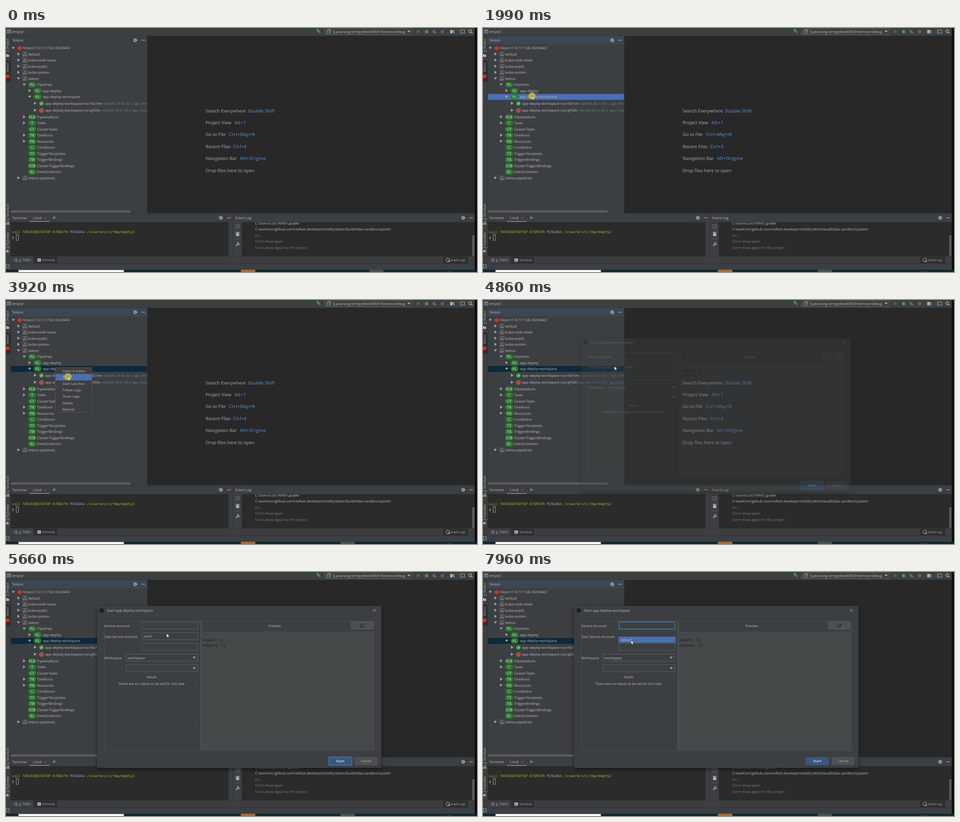
These frames come from a looping animation (1037 px wide and 540 px high, 8000 ms). An HTML page:

```html
<!DOCTYPE html>
<html lang="en">
<head>
<meta charset="utf-8">
<title>Tekton pipeline start</title>
<style>
html, body { margin: 0; width: 100%; height: 100%; overflow: hidden; background: #3c3f41; }
svg { display: block; }
text { font: 7.8px "Open Sans", "Noto Sans", sans-serif; fill: #bbb; text-rendering: geometricPrecision; white-space: pre; }
.dim { fill: #7b7d7f; }
.small { font-size: 6.7px; }
.form { font-size: 7.6px; }
.log { font-size: 7.7px; }
.hint { font-size: 10px; fill: #aeaeae; }
.key { font-size: 10px; fill: #589df6; }
.mono { font: 7.86px "DejaVu Sans Mono", monospace; }
.pill { font-size: 7.6px; fill: #e6efe6; letter-spacing: .4px; }
.mid { text-anchor: middle; }
.bold { font-weight: 700; fill: #c4c8cc; }
.line { fill: none; stroke: #afb1b3; }

/* 1% = 80 ms */
.anim { opacity: 0; animation: 8s step-end -5ms infinite; }
#cursor { animation: move 8s linear -5ms infinite; }
#dialog { transform-origin: 513.5px 254.5px; }

@keyframes move {
  0%, 2.41% { transform: translate(1000px, 561px); animation-timing-function: steps(11); }
  13% { transform: translate(83px, 221px); animation-timing-function: steps(3); }
  16% { transform: translate(74px, 180px); animation-timing-function: steps(6); }
  22.125%, 42% { transform: translate(108px, 150px); animation-timing-function: steps(3); }
  45%, 55.75% { transform: translate(136.5px, 169.5px); animation-timing-function: steps(6); }
  61.875%, 69.8% { transform: translate(365.5px, 135px); animation-timing-function: steps(5); }
  74.6% { transform: translate(306px, 140px); animation-timing-function: steps(6); }
  80.375%, 92.75% { transform: translate(324.5px, 120.5px); animation-timing-function: steps(3); }
  95.75%, 96.69% { transform: translate(328px, 162px); animation-timing-function: steps(3); }
  99.5%, 100% { transform: translate(326px, 151px); }
}
@keyframes press {
  24.875% { opacity: .8; } 30.4% { opacity: 0; }
  46.875% { opacity: .4; } 48% { opacity: .6; } 49% { opacity: .8; } 50.875% { opacity: 0; }
  84.125% { opacity: .5; } 85.125% { opacity: .8; } 86.125% { opacity: 0; }
}
@keyframes tipLow { 16% { opacity: 1; } 18% { opacity: 0; } }
@keyframes tipHigh {
  18% { opacity: 1; } 21.1% { opacity: 0; }
  52% { opacity: 1; } 56.75% { opacity: 0; }
}
@keyframes idle { 0% { opacity: 1; } 24.875%, 100% { opacity: 0; } }
@keyframes active { 24.875%, 100% { opacity: 1; } }
@keyframes row {
  24.125% { opacity: 1; fill: #4b6eaf; }
  28.5% { opacity: 1; fill: #0d293e; }
  50.875% { opacity: 1; fill: #4b6eaf; }
  60.75%, 100% { opacity: 1; fill: #0d293e; }
}
@keyframes menu { 30.4% { opacity: .5; } 31.375% { opacity: 1; } 50.875% { opacity: 0; } }
@keyframes hoverOpen { 43% { opacity: 1; } 45% { opacity: 0; } }
@keyframes hoverStart { 45% { opacity: 1; } 50.875% { opacity: 0; } }
@keyframes dialog {
  60.75% { opacity: .35; transform: scale(.95); }
  61.8% { opacity: .74; transform: scale(.986); }
  62.6% { opacity: .95; transform: scale(.996); }
  63.6%, 100% { opacity: 1; transform: none; }
}
@keyframes ringButton { 0% { opacity: 1; } 82.25%, 100% { opacity: 0; } }
@keyframes ringField { 82.25%, 100% { opacity: 1; } }
@keyframes popup { 93.75%, 100% { opacity: 1; } }
@keyframes hoverItem { 94.75%, 100% { opacity: 1; } }
</style>
</head>
<body>
<svg id="stage" width="1037" height="540" viewBox="0 0 1037 540"></svg>
<script>
const PANEL = '#3c3f41', DARK = '#2b2b2b', EDGE = '#323232', ICON = '#afb1b3', BLUE = '#4b6eaf';

// y is the vertical centre of the text
const text = (x, y, s, cls = '', more = '') =>
  `<text x="${x}" y="${y}" dy=".36em" class="${cls}" ${more}>${s}</text>`;
const rect = (x, y, w, h, fill, more = '') =>
  `<rect x="${x}" y="${y}" width="${w}" height="${h}" fill="${fill}" ${more}/>`;
const path = (d, fill = ICON, more = '') => `<path d="${d}" fill="${fill}" ${more}/>`;
const line = (d, color = ICON, width = 1) => `<path d="${d}" fill="none" stroke="${color}" stroke-width="${width}"/>`;
const dot = (x, y, r, fill) => `<circle cx="${x}" cy="${y}" r="${r}" fill="${fill}"/>`;
const at = (x, y, s) => `<g transform="translate(${x} ${y})">${s}</g>`;
const anim = (name, s, id = '') => `<g class="anim" ${id && `id="${id}"`} style="animation-name:${name}">${s}</g>`;
const clip = (id, s) => `<g clip-path="url(#${id})">${s}</g>`;
const clipBox = (id, x, y, w, h) => `<clipPath id="${id}">${rect(x, y, w, h, '#000')}</clipPath>`;

const gear = (x, y) => at(x, y,
  '<circle r="2.3" class="line" stroke-width="1.7"/><circle r="3.6" class="line" stroke-width="1.5" stroke-dasharray="1.5 1.33"/>');
const dash = (x, y) => rect(x - 4, y - .6, 8, 1.2, ICON);
const cross = (x, y, r, color, w) => line(`M${x - r} ${y - r}l${2 * r} ${2 * r}m0 ${-2 * r}l${-2 * r} ${2 * r}`, color, w);
const arrowRight = (x, y) => at(x, y, path('M-2.4-3.6 3 0-2.4 3.6z', '#a4a6a8'));
const arrowDown = (x, y, r = 3.5) => at(x, y, path(`M${-r} ${-r * .6}H${r}L0 ${r * .75}z`, '#a4a6a8'));

// Tree
const rowY = i => i < 9 ? 44.5 + 13.5 * i : i < 11 ? 167 + 15.5 * (i - 9) : 197 + 13.5 * (i - 11);
const ARROW_X = [16, 27.5, 40, 52, 64], ICON_X = [30, 41.5, 57.5, 69.5, 78], TEXT_X = [37, 49, 68.5, 81, 86];
const tree = [
  [0, 'v', 'host', 'https://172.17.158.182:8443/'],
  [1, '>', 'ns', 'default'], [1, '>', 'ns', 'kube-node-lease'], [1, '>', 'ns', 'kube-public'],
  [1, '>', 'ns', 'kube-system'], [1, 'v', 'ns', 'tekton'],
  [2, 'v', 'PL', 'Pipelines'], [3, '>', 'PL', 'app-deploy'], [3, 'v', 'PL', 'app-deploy-workspace'],
  [4, '>', 'ok', 'app-deploy-workspace-run-hb7vm'], [4, '>', 'bad', 'app-deploy-workspace-run-g569n'],
  [2, '>', 'PLR', 'PipelineRuns'], [2, '>', 'T', 'Tasks'], [2, '', 'CT', 'ClusterTasks'],
  [2, '>', 'TR', 'TaskRuns'], [2, '>', 'PR', 'Resources'], [2, '', 'C', 'Conditions'],
  [2, '', 'TT', 'TriggerTemplates'], [2, '', 'TB', 'TriggerBindings'],
  [2, '', 'CTB', 'ClusterTriggerBindings'], [2, '', 'EL', 'EventListeners'],
  [1, '>', 'ns', 'tekton-pipelines'],
];
const icons = {
  host: () => dot(0, 0, 4.6, '#d9301f'),
  ns: () => rect(-4.5, -4.5, 9, 9, 'none', 'stroke="#7f8284" stroke-width=".8"') +
    rect(-1.1, -2.9, 2.2, 2, ICON) + rect(-3, .9, 2.2, 2, ICON) + rect(.8, .9, 2.2, 2, ICON),
  ok: () => dot(0, 0, 4.9, '#3f9a45') + line('M-2.3 .1-.6 1.9 2.4-1.7', '#d5ead5', 1.1),
  bad: () => dot(0, 0, 4.9, '#c94f4f') + cross(0, 0, 1.9, '#4a2222', 1),
};
const pill = s => rect(-8.6, -5.7, 17.2, 11.4, '#2c7d2f', 'rx="5.7"') + text(.2, 0, s, 'pill mid');
const status = i => i === 9
  ? text(214, rowY(9), 'started 28 m 36 s&#160; ago, finished in 0 s', 'dim')
  : text(211.5, rowY(10), 'started 29 m 35 s&#160; ago, finished in 0 s', 'dim');
const treeRow = ([level, arrow, icon, label], i) => {
  const y = rowY(i);
  return (arrow === 'v' ? arrowDown(ARROW_X[level], y - .5) : arrow ? arrowRight(ARROW_X[level], y - .5) : '') +
    at(ICON_X[level], y, icons[icon] ? icons[icon]() : pill(icon)) + text(TEXT_X[level], y, label);
};
const tip = (i, right) => clip('beyond', rect(310, rowY(i) - 7.7, right - 310, 15.4, PANEL) + status(i));

const toolPanel = () =>
  anim('active', rect(10.5, 18, 300.5, 18, '#3b4754')) +
  text(14, 27, 'Tekton') + gear(284.5, 27) + dash(302.5, 27) +
  rect(10.5, 146, 300, 13, BLUE, 'class="anim" style="animation-name:row"') +
  clip('panel', tree.map(treeRow).join('') + status(9) + status(10)) +
  rect(11, 403.5, 263, 5.5, '#595b5d');

// Frame of the window
const side = (y, s) => text(0, 0, s, 'small', `transform="translate(4 ${y}) rotate(-90)"`);
const toolbar = () =>
  rect(2, 3.5, 9.5, 8.5, '#7c8a94') + rect(3, 6, 7.5, 5, '#4a6a80') + text(14, 8, 'empty1') +
  path('M683 5l4-3.4 2.4 1.2-1.2 1.6 4.6 5.2-1.8 1.8-4.9-5-1.6 1.3z', '#499c54') +
  rect(701.5, .5, 193.5, 14, PANEL, 'rx="2" stroke="#646668"') +
  rect(708.5, 3.5, 6.5, 6, 'none', 'stroke="#afb1b3" stroke-width=".9"') +
  rect(706.5, 6, 6.5, 6, PANEL, 'stroke="#87a9c0" stroke-width=".9"') +
  text(720, 8, '[Ljava.lang.String;@4e4df039 Remote Debug', 'log') + arrowDown(887.5, 7.5) +
  path('M905 4l7 4-7 4z', '#5f6264') +
  '<ellipse cx="926" cy="8.3" rx="2.8" ry="3.8" fill="#499c54"/>' +
  line('M922 4.5l8 7.5m0-7.5l-8 7.5M921.5 8.3h9', '#499c54', .9) +
  path('M939 4h6v4l-3 4-3-3z', '#5f6264') + path('M943 7l5 2.8-5 2.8z', '#6c6f71') +
  rect(957.5, 4.5, 7, 7, '#5f6264') +
  line('M973.5 3v10M994.5 3v10', '#515456') +
  path('M978 4h3.5l1 1.3h4V8H983v4h-5z') + rect(984, 8.5, 4, 3.5, '#4b91c8') +
  rect(1000.5, 4, 9, 7.5, 'none', 'stroke="#afb1b3"') + line('M1002.3 6l1.7 1.6-1.7 1.6', '#59a869') +
  '<circle cx="1022" cy="7" r="3" class="line" stroke-width="1.3"/>' + line('M1024.2 9.3l3 3', ICON, 1.5);

const sidebar = () =>
  rect(0, 72, 10, 47, '#2d2f30') +
  side(53, '<tspan text-decoration="underline">1</tspan>: Project') + path('M0 58h3l1 1h3v5H0z') +
  side(98, 'Tekton') + dot(3.5, 107, 4, '#d9301f') +
  side(425, '<tspan text-decoration="underline">2</tspan>: Structure') +
  rect(0, 432, 3, 3, ICON) + rect(4, 432, 3, 3, ICON) + rect(3, 428, 3, 3, ICON) +
  side(488, '<tspan text-decoration="underline">2</tspan>: Favorites') +
  path('M3.3 489.5l1.2 3h3l-2.4 2 .9 3-2.7-1.8-2.7 1.8.9-3-2.4-2h3z');

const HINTS = [
  ['Search Everywhere', 'Double Shift', 532.5, .15], ['Project View', 'Alt+1', 503, .47],
  ['Go to File', 'Ctrl+Maj+N', 491, .47], ['Recent Files', 'Ctrl+E', 500, .47],
  ['Navigation Bar', 'Alt+Origine', 515, .47], ['Drop files here to open', '', 0, 0],
];
const hints = () => HINTS.map(([label, key, x, gap], i) => {
  const y = 183 + 26.4 * i;
  return text(439.5, y, label, 'hint') + (key && text(x, y, key, 'key', `letter-spacing="${gap}"`));
}).join('');

const terminal = () =>
  rect(10.5, 429.5, 479.5, 75.5, DARK) +
  text(14, 420.5, 'Terminal:', 'form') + text(59.5, 420.5, 'Local') + cross(86.5, 420.5, 2, '#777a7c', .8) +
  rect(52.5, 427, 44, 2.2, '#747a80') + line('M102.5 419.8h7.4m-3.7-3.7v7.4') +
  gear(473, 420) + dash(491, 420) +
  text(13, 451, 'Loic TARVE@DESKTOP-K7QRXTN', 'mono', 'style="fill:#a8a820"') +
  text(140.7, 451, 'MINGW64', 'mono', 'style="fill:#9c8fa0"') +
  text(178.5, 451, '/c/work/src/tmp/empty1', 'mono', 'style="fill:#b5b52a"') +
  text(13, 464.5, '$', 'mono') + rect(22.5, 457, 4.8, 13, 'none', 'stroke="#b0b0b0" stroke-width=".9"');

const eventLog = () =>
  rect(499, 410, 1, 95, EDGE) + rect(519, 429.5, 513, 75.5, DARK) +
  text(505, 420.5, 'Event Log') + gear(1006.5, 420) + dash(1024, 420) +
  rect(506, 435.5, 7.5, 7.5, 'none', 'stroke="#6a6d6f"') + line('M508 439l2 2 4.5-5', '#6a6d6f') +
  path('M506.5 454h7v6.5h-7zM505.5 452h9v1.2h-9zM508.5 451h3v1h-3z') +
  line('M502 466.5h16', '#515456') + line('M506.5 482.5l4.5-4.5', ICON, 1.8) +
  '<circle cx="512" cy="477" r="2.2" class="line" stroke-width="1.5" stroke-dasharray="10.4 3.4"/>' +
  clip('log',
    text(548.5, 432.3, 'C:\\Users\\LoicTARVE\\.gradle', 'log') +
    text(548.5, 445.6, 'C:\\work\\src\\github.com\\redhat-developer\\intellij-tekton\\build\\idea-sandbox\\system', 'log') +
    ['Fix...', "Don't show again", "Don't show again for this project"]
      .map((s, i) => text(548.5, 459 + 13.4 * i, s, 'log dim')).join('')) +
  rect(1026.5, 458.5, 5, 46, '#595b5d');

const bottom = () =>
  rect(61, 506, 52, 15, '#2d2f30') + rect(962, 506, 56, 15, '#2d2f30') +
  line('M18 511.5h1.5m1 0h4.5M18 514h1.5m1 0h4.5M18 516.5h1.5m1 0h4.5') +
  text(28.5, 514, '<tspan text-decoration="underline">6</tspan>: TODO', 'small') +
  rect(69, 510, 8, 7.5, ICON) + line('M70.5 512l1.8 1.6-1.8 1.6M73 516h2.5', '#2d2f30') +
  text(80, 514, 'Terminal', 'small') +
  '<circle cx="973" cy="513.5" r="4" class="line" stroke-width="1.1"/>' + path('M973 515l4.5 3.5-1-5z') +
  text(980, 514, 'Event Log', 'small') +
  line('M0 521.5h1032', EDGE, .8) +
  rect(.5, 524, 6.5, 7, 'none', 'stroke="#afb1b3" stroke-width=".9"') +
  rect(0, 535, 1037, 5, '#0e2733') + rect(27.5, 535.5, 232, 4.5, '#fafafa') + rect(517, 535, 32, 5, '#b26a2c') +
  anim('idle', rect(800, 535, 31, 5, '#4b4e59')) + anim('active', rect(737, 535, 31, 5, '#45525d')) +
  text(963, 542, '10:38', 'small');

// Context menu
const MENU = ['Open in Editor', 'Start', 'Start Last Run', 'Follow Logs', 'Show Logs', 'Delete', 'Refresh'];
const menu = () => anim('menu',
  rect(108.5, 149.5, 80.5, 99, PANEL, 'stroke="#515355"') +
  anim('hoverOpen', rect(109, 150, 80, 14, BLUE)) + anim('hoverStart', rect(109, 163.5, 80, 14.5, BLUE)) +
  MENU.map((s, i) => text(124.5, 156.8 + 14.2 * i, s, 'form')).join(''));

// Dialog
const field = (x, y) => rect(x, y, 422.3 - x, 15.5, PANEL, 'stroke="#606365"');
const button = (x, y, w, h, fill, edge) => rect(x, y, w, h, fill, `rx="2" stroke="${edge}"`);
const dialog = () => anim('dialog',
  rect(200.5, 75, 626, 358.5, PANEL, 'style="filter:drop-shadow(0 3px 4px #0008)"') +
  rect(206.5, 81, 8.5, 8.5, '#1b1b22') + text(222, 85.3, 'Start app-deploy-workspace') +
  cross(811, 85, 3.3, ICON, .9) +
  rect(216.5, 108.5, 212, 286.5, 'none', 'stroke="#4d5052"') +
  rect(431.5, 108.5, 379.5, 286.5, 'none', 'stroke="#4d5052"') +
  rect(432, 131.5, 378.5, 263, '#45494a') +
  '<path d="M429.5 109v286" stroke="#6a6d6f" stroke-dasharray="1.2 1.2"/>' +
  text(591.5, 119, 'Preview', 'form mid') +
  button(760.5, 110.5, 48, 16, '#4c5052', '#5e6060') +
  line('M780.8 117.5a3.6 3.6 0 0 1 6.5-1.2m.5 3.2a3.6 3.6 0 0 1-6.5 1.2', '#1c1d1e', 1.2) +
  path('M788.6 114.5v3h-3zM780.2 122.5v-3h3z', '#1c1d1e') +
  ['---', 'inputs: {}', 'outputs: {}']
    .map((s, i) => text(432, 138.5 + 11.8 * i, s, 'mono', 'style="fill:#141515"')).join('') +
  text(216.5, 119, 'Service Account', 'form') + field(299.8, 110.7) +
  text(216.5, 143, 'Task Service Account', 'form') + field(299.8, 134.3) + text(303.5, 142.5, 'task1', 'form') +
  field(299.8, 158) +
  text(216.5, 190, 'Workspace', 'form') + field(264.5, 181.7) + text(268, 190, 'workspace', 'form') +
  field(264.5, 205.3) + arrowDown(414.5, 189.5, 3.2) + arrowDown(414.5, 213, 3.2) +
  text(320.5, 232.3, 'Inputs', 'form mid') +
  text(320.5, 247, 'There are no inputs to be set for this task', 'form mid') +
  button(711.5, 410.5, 49, 16, '#365880', '#41648c') +
  anim('ringButton', rect(710.5, 409.5, 51, 18, 'none', 'rx="2.5" stroke="#466d94" stroke-width="2"')) +
  text(736, 418.7, 'Start', 'form mid bold') +
  button(768.5, 410.5, 48.5, 16, '#4c5052', '#5e6060') + text(792.5, 418.7, 'Cancel', 'form mid') +
  anim('ringField', rect(299.5, 110.5, 123, 16, 'none', 'rx="1.5" stroke="#466d94" stroke-width="2"')) +
  anim('popup',
    rect(298.5, 128.5, 125.5, 28.5, PANEL) +
    anim('hoverItem', rect(298.5, 143, 125.5, 13.5, BLUE)) + text(303.5, 150, 'default', 'form')),
  'dialog');

const cursor = () => '<g id="cursor">' +
  anim('press', dot(0, .5, 8, '#d2c31c')) +
  path('M0 0V8.8L2 7 3.4 10.2 4.9 9.5 3.5 6.5H6.3z', '#fff', 'stroke="#111" stroke-width=".6"') + '</g>';

document.getElementById('stage').innerHTML =
  '<defs>' + clipBox('panel', 0, 18, 310.5, 392) + clipBox('beyond', 310.5, 100, 60, 120) +
  clipBox('log', 519, 429.5, 507, 75.5) + '</defs>' +
  rect(0, 0, 1037, 540, PANEL) + rect(311, 17.5, 721, 392.5, '#282828') +
  line('M0 17.5h1032M10.2 17.5V505M311 17.5V410M10 410h1022M0 505.3h1032', EDGE, .8) +
  toolbar() + sidebar() + toolPanel() + hints() + terminal() + eventLog() + bottom() +
  rect(1032, 0, 5, 535, '#0b0b0b') +
  anim('tipLow', tip(10, 348.5)) + anim('tipHigh', tip(9, 351)) +
  menu() + dialog() + cursor();
</script>
</body>
</html>
```
